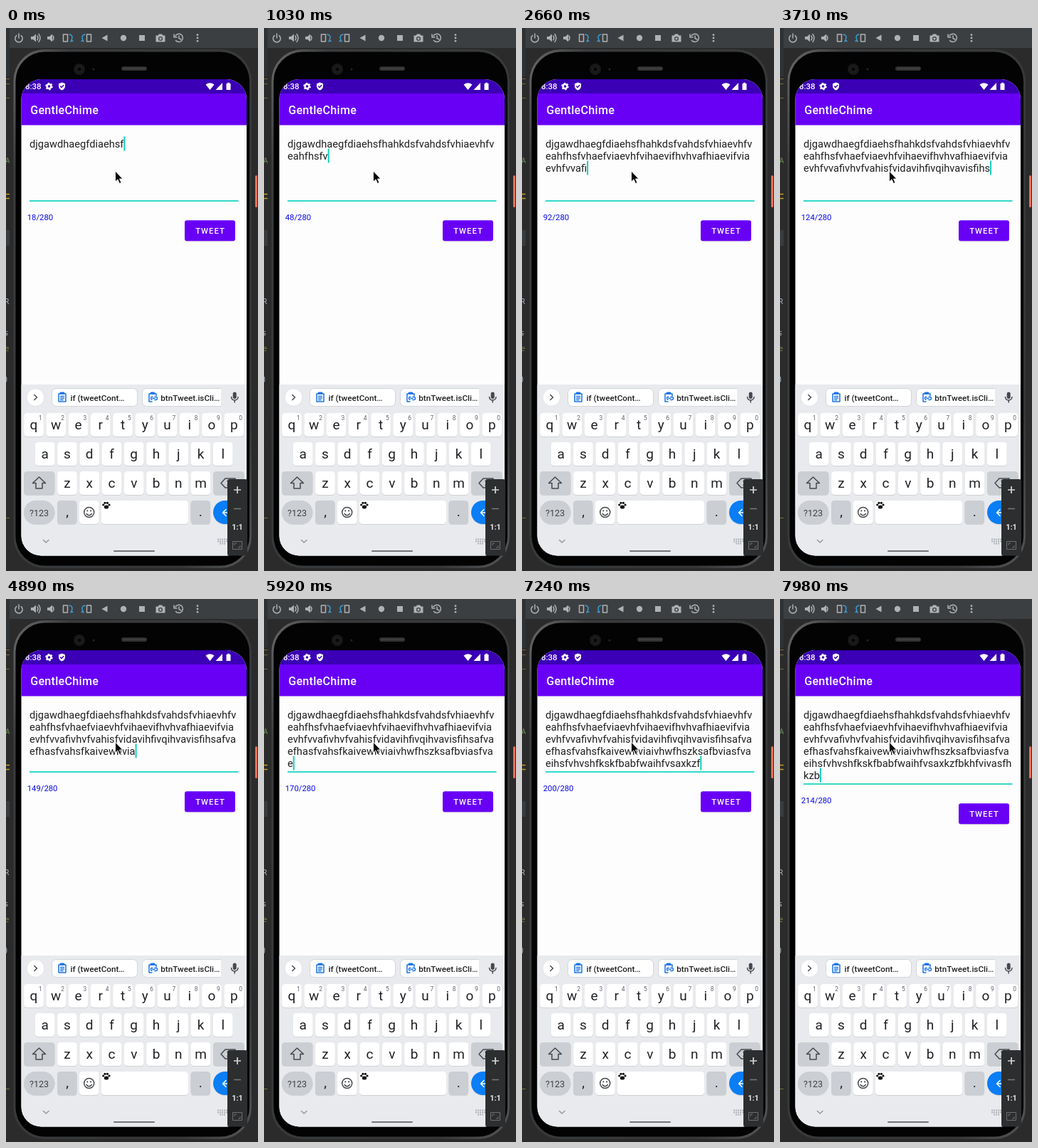
Recreate the animation shown at these times as an HTML page. Size 354x763 px, loop 8000 ms.

```html
<!DOCTYPE html>
<html lang="en">
<head>
<meta charset="utf-8">
<title>Typing in a phone emulator</title>
<style>
html, body { margin: 0; width: 100%; height: 100%; overflow: hidden; background: #2b2b2b; }
svg { display: block; width: 354px; height: 763px; font-family: Roboto, sans-serif; }
.line { fill: none; stroke-width: 1.5; stroke-linecap: round; stroke-linejoin: round; }
.mid { text-anchor: middle; }
.bold { font-weight: 500; }
.tool { stroke: #afb1b3; }
.toolfill { fill: #afb1b3; }
.blue { stroke: #389fd6; }
.dark { stroke: #45484c; }
.key { font-size: 19px; fill: #202124; text-anchor: middle; }
.hint { font-size: 8.5px; fill: #5f6368; text-anchor: middle; }
.code { font: 11px "Noto Sans Mono", monospace; }
#typed { font-size: 14.65px; fill: #212121; }
</style>
</head>
<body>
<svg viewBox="0 0 354 763">
  <defs>
    <clipPath id="screen"><rect x="21.5" y="72" width="316.5" height="669.500" rx="28"/></clipPath>
    <clipPath id="chips"><rect x="60" y="500" width="242" height="40"/></clipPath>
    <clipPath id="margin"><rect width="5" height="763"/></clipPath>
    <linearGradient id="rim" x2="1" y2="1">
      <stop stop-color="#686a6c"/><stop offset=".12" stop-color="#3a3c3e"/>
      <stop offset=".85" stop-color="#343638"/><stop offset="1" stop-color="#545658"/>
    </linearGradient>
  </defs>

  <!-- editor and emulator window -->
  <rect width="354" height="763" fill="#2b2b2b"/>
  <rect x="5" y="0" width="349" height="28" fill="#3c3f41"/>
  <g clip-path="url(#margin)" class="code">
    <rect y="0" width="5" height="68" fill="#2f3234"/>
    <rect y="284" width="5" height="22" fill="#393c3e"/>
    <path d="M0 71.5H5M0 78.5H5M0 98.5H5" stroke="#77683b"/>
    <path d="M0 233.5H5M0 239.5H5" stroke="#c39a25" stroke-width="1.5"/>
    <path d="M0 688.5H5" stroke="#777638"/>
    <text x="-1" y="190" fill="#6a8759">A</text>
    <text x="-2" y="388" fill="#a9b7c6">R</text>
    <text x="-3" y="432" fill="#a9b7c6">s</text>
    <text x="-2" y="454" fill="#77824c">e</text>
    <text x="-3" y="497" fill="#a9b7c6">)</text>
  </g>
  <rect x="350" y="207" width="3" height="45" rx="1.5" fill="#ed7058"/>

  <g class="line tool">
    <path d="M14.8 10.6A5.2 5.2 0 1 0 21.2 10.6M18 8V14"/>
    <path d="M44 11Q46 14 44 17M46 8.5Q50 14 46 19.5M66 11Q68 14 66 17"/>
    <path d="M80.500 9H86.500V19H80.500ZM113.500 9H119.500V19H113.500Z"/>
    <path d="M89 9Q95 10 92 17M91 19L92 17.500L94 18.500M111 9Q105 10 108 17M109 19L108 17.500L106 18.500" class="blue"/>
    <path d="M238 11A5.6 5.6 0 1 1 238.5 17.5M236 9V13H240M243 11V14.5L246 16"/>
  </g>
  <g class="toolfill">
    <path d="M35 12H38L42 8.5V19.5L38 16H35ZM58 12H61L65 8.5V19.5L61 16H58Z"/>
    <path d="M134.5 14L142.5 9.5V18.5Z"/><circle cx="165" cy="14" r="4.2"/>
    <rect x="187" y="10" width="8" height="8"/>
    <path d="M210.5 10.5H213.5L215 8.5H219L220.5 10.5H223.5V19.5H210.5Z"/>
    <circle cx="217" cy="15" r="3" fill="#3c3f41"/><circle cx="217" cy="15" r="1.7"/>
    <circle cx="269" cy="9.7" r="1.4"/><circle cx="269" cy="14" r="1.4"/><circle cx="269" cy="18.3" r="1.4"/>
  </g>

  <!-- phone -->
  <rect x="10.500" y="30" width="334.500" height="729" rx="44" fill="url(#rim)"/>
  <rect x="13.500" y="33.500" width="328.500" height="722" rx="41" fill="#030303"/>
  <circle cx="103" cy="58" r="8" fill="#181818"/><circle cx="103" cy="58" r="3.5" fill="#070709" stroke="#2a2a2d"/>
  <circle cx="123" cy="58" r="1.5" fill="#252525"/>
  <rect x="162" y="54" width="36" height="6" rx="3" fill="#303030"/>
  <path d="M165 57H196" stroke="#4d4d4d" stroke-width="2" stroke-dasharray="1 1"/>

  <g clip-path="url(#screen)">
    <rect x="21" y="72" width="318" height="670" fill="#fdfdfd"/>
    <rect x="21" y="92" width="318" height="44.500" fill="#6800f6"/>
    <rect x="21" y="72" width="318" height="20" fill="#3b00b6"/>
    <g fill="#fff">
      <text x="27" y="86" font-size="11.5" class="bold">8:38</text>
      <circle cx="60.500" cy="82" r="3" fill="none" stroke="#fff" stroke-width="2.4"/>
      <circle cx="60.500" cy="82" r="4.5" fill="none" stroke="#fff" stroke-width="1.6" stroke-dasharray="2.3 2.4"/>
      <path d="M78.500 76.500L83 78.300V81.500Q83 85.500 78.500 87.500Q74 85.500 74 81.500V78.300Z"/>
      <path d="M76.500 82L78 83.500L80.800 80.500" class="line" stroke="#3b00b6" stroke-width="1.2"/>
      <path d="M280.500 79.500Q286.500 75 292.500 79.500L286.500 87ZM304 77V87H294.500ZM309.500 78H311V76.800H314V78H315.500V87H309.500Z"/>
      <text x="34.200" y="120.500" font-size="16.1" letter-spacing=".28" class="bold">GentleChime</text>
    </g>

    <g id="typed"></g>
    <rect id="caret" width="2" height="20" fill="#12cfc0"/>
    <g id="below">
      <rect x="33" y="242.100" width="293.500" height="1.700" fill="#12d3c3"/>
      <text id="count" x="29.700" y="270" font-size="11.3" fill="#0909e4"></text>
      <rect x="251" y="271" width="71" height="29.300" rx="3.500" fill="#dcdcdc"/>
      <rect x="251" y="270.200" width="71" height="29" rx="3.200" fill="#6800f6"/>
      <text x="287" y="289" font-size="11.3" letter-spacing="1" fill="#fff" class="mid bold">TWEET</text>
    </g>

    <!-- keyboard -->
    <rect x="21" y="501" width="318" height="241" fill="#e8eaed"/>
    <circle cx="41.500" cy="519" r="12.300" fill="#fff" stroke="#dadce0" stroke-width=".7"/>
    <path d="M39.800 515.500L43.500 519L39.800 522.500" class="line dark"/>
    <g clip-path="url(#chips)" font-size="11.7" fill="#202124" class="bold">
      <g fill="#fff" stroke="#d2d5d9"><rect x="64.500" y="506.500" width="120" height="25" rx="6"/><rect x="191.500" y="506.500" width="125" height="25" rx="6"/></g>
      <g class="line" stroke="#1a73e8">
        <path d="M74 514H84V525H74ZM76.500 517.500H81.500M76.500 520H81.500M76.500 522.500H80"/>
        <path d="M205 525H201V514H211V517M205 522H204.500A2 2 0 0 1 204.500 518.500H206M209 518.500H210.500A2 2 0 0 1 210.500 522.500H209M206 520.500H209"/>
        <path d="M77 513H81M204 513H208" stroke-width="3"/>
      </g>
      <text x="90.500" y="523.500">if (tweetCont…</text>
      <text x="217.200" y="523.500">btnTweet.isCli…</text>
    </g>
    <rect x="318.700" y="511.500" width="5" height="9.500" rx="2.500" fill="#45484c"/>
    <path d="M316.500 518.500Q317 523 321.200 523T326 518.500M321.200 523V526" class="line dark"/>
    <g id="keys"></g>

    <path d="M37.500 639.500L46.500 631L55.500 639.500H51V647H42V639.500Z" class="line dark"/>
    <path d="M302 639.500L308 633H322V646H308ZM311 636.500L317 642.500M317 636.500L311 642.500" class="line dark"/>
    <g class="line dark">
      <circle cx="116.700" cy="680.500" r="7"/><path d="M113 682.500Q116.700 687 120.400 682.500"/>
      <path d="M114.300 678.300V678.500M119.100 678.300V678.500" stroke-width="2"/>
    </g>
    <g fill="#111">
      <ellipse cx="141" cy="673" rx="3.200" ry="2.600"/>
      <circle cx="136.700" cy="670" r="1.600"/><circle cx="139" cy="667.300" r="1.600"/>
      <circle cx="142.400" cy="667.300" r="1.600"/><circle cx="145" cy="670" r="1.600"/>
    </g>
    <path d="M305 681H318M309 676.500L304.500 681L309 685.500" class="line" stroke="#fff" stroke-width="2"/>
    <path d="M52.500 719.500L56.200 723L60 719.500" class="line" stroke="#93979c"/>
    <rect x="151" y="734" width="58" height="2" rx="1" fill="#727478"/>
    <path d="M297 718.500H311M297 721.500H311M300 724.500H308" stroke="#b0b3b7" stroke-width="2" stroke-dasharray="2 1"/>
  </g>

  <!-- zoom panel -->
  <rect x="311" y="634" width="28" height="107.500" rx="3" fill="#2c2e30"/>
  <path d="M320 649H330M325 644V654" stroke="#d5d6d7" stroke-width="1.700"/>
  <path d="M320 675.500H330" stroke="#77797b" stroke-width="1.500"/>
  <text x="325" y="705" font-size="11" font-weight="700" fill="#e4e4e4" class="mid">1:1</text>
  <path d="M318.500 721.500H331.500V732.500H318.500ZM321 727V724H324M326 730H329V727" fill="none" stroke="#6d6f71"/>

  <path d="M153.500 201V216L157 212.800L159.500 218.500L162 217.400L159.500 212H164Z" fill="#050505" stroke="#fff" stroke-width=".9"/>
</svg>

<script>
const SVG = "http://www.w3.org/2000/svg";
const $ = id => document.getElementById(id);

function add(parent, tag, attrs, text = "") {
  const node = document.createElementNS(SVG, tag);
  for (const name in attrs) node.setAttribute(name, attrs[name]);
  node.textContent = text;
  return parent.appendChild(node);
}

// Keyboard
const PITCH = 31.25;
const keys = $("keys");

function keyCap(x, y, width, fill = "#fff", rx = 4.5) {
  add(keys, "rect", { x, y: y + 1, width, height: 33, rx, fill: "#cfd2d6" });
  add(keys, "rect", { x, y, width, height: 33, rx, fill });
}

function keyRow(letters, firstX, y, hints = "") {
  [...letters].forEach((letter, i) => {
    const x = firstX + i * PITCH;
    keyCap(x - 13.8, y, 27.6);
    add(keys, "text", { x, y: y + 23, class: "key" }, letter);
    if (hints) add(keys, "text", { x: x + 9.3, y: y + 10, class: "hint" }, hints[i]);
  });
}

keyRow("qwertyuiop", 39, 541, "1234567890");
keyRow("asdfghjkl", 54.7, 582);
keyRow("zxcvbnm", 86, 623);
const GREY = "#cbced3";
keyCap(25, 623, 43.5, GREY);
keyCap(291, 623, 43.5, GREY);
keyCap(25, 664, 43.5, GREY, 16.5);
keyCap(72, 664, 27.6, GREY);
keyCap(103, 664, 27.6);
keyCap(134, 664, 122);
keyCap(259.5, 664, 27.6, GREY);
keyCap(291, 664, 43.5, "#0b7df5", 16.5);
add(keys, "text", { x: 46.5, y: 685.5, "font-size": 12.5, fill: "#3c4043", class: "mid" }, "?123");
add(keys, "text", { x: 86, y: 686, class: "key" }, ",");
add(keys, "text", { x: 273.3, y: 686, class: "key" }, ".");

// Typing
const LINES = [
  "djgawdhaegfdiaehsfhahkdsfvahdsfvhiaevhfv",
  "eahfhsfvhaefviaevhfvihaevifhvhvafhiaevifvia",
  "evhfvvafivhvfvahisfvidavihfivqihvavisfihsafva",
  "efhasfvahsfkaivewhviaivhwfhszksafbviasfva",
  "eihsfvhvshfkskfbabfwaihfvsaxkzfbkhfvivasfh",
  "kzb"
];
const LEFT = 33, TOP = 168, LEADING = 17, LOOP = 8000;
const rows = LINES.map((_, i) => add($("typed"), "text", { x: LEFT, y: TOP + i * LEADING }));

// [step, characters typed by then]
const PACE = [[0, 18], [7, 48], [16, 84], [18, 92], [23, 117], [25, 124], [39, 167], [40, 170], [49, 200], [54, 214]];
const SHORT_STEPS = new Set([2, 5, 12, 16, 28, 31, 34, 37, 40, 44, 48, 52]);

function stepAt(time) {
  let step = 0, end = 0;
  while (step < 54 && time >= (end += SHORT_STEPS.has(step) ? 140 : 150)) step++;
  return step;
}

function typedAt(step) {
  const i = Math.max(1, PACE.findIndex(([s]) => s >= step));
  const [s0, n0] = PACE[i - 1], [s1, n1] = PACE[i];
  return Math.round(n0 + (n1 - n0) * (step - s0) / (s1 - s0));
}

function show(total) {
  let left = total, last = 0;
  LINES.forEach((line, i) => {
    rows[i].textContent = line.slice(0, left);
    if (left > 0) last = i;
    left = Math.max(0, left - line.length);
  });
  $("caret").setAttribute("x", LEFT + rows[last].getComputedTextLength());
  $("caret").setAttribute("y", TOP - 15.5 + last * LEADING);
  $("count").textContent = total + "/280";
  $("below").setAttribute("transform", `translate(0 ${last > 4 ? LEADING : 0})`);
}

function frame() {
  show(typedAt(stepAt(performance.now() % LOOP)));
  requestAnimationFrame(frame);
}
frame();
</script>
</body>
</html>
```
